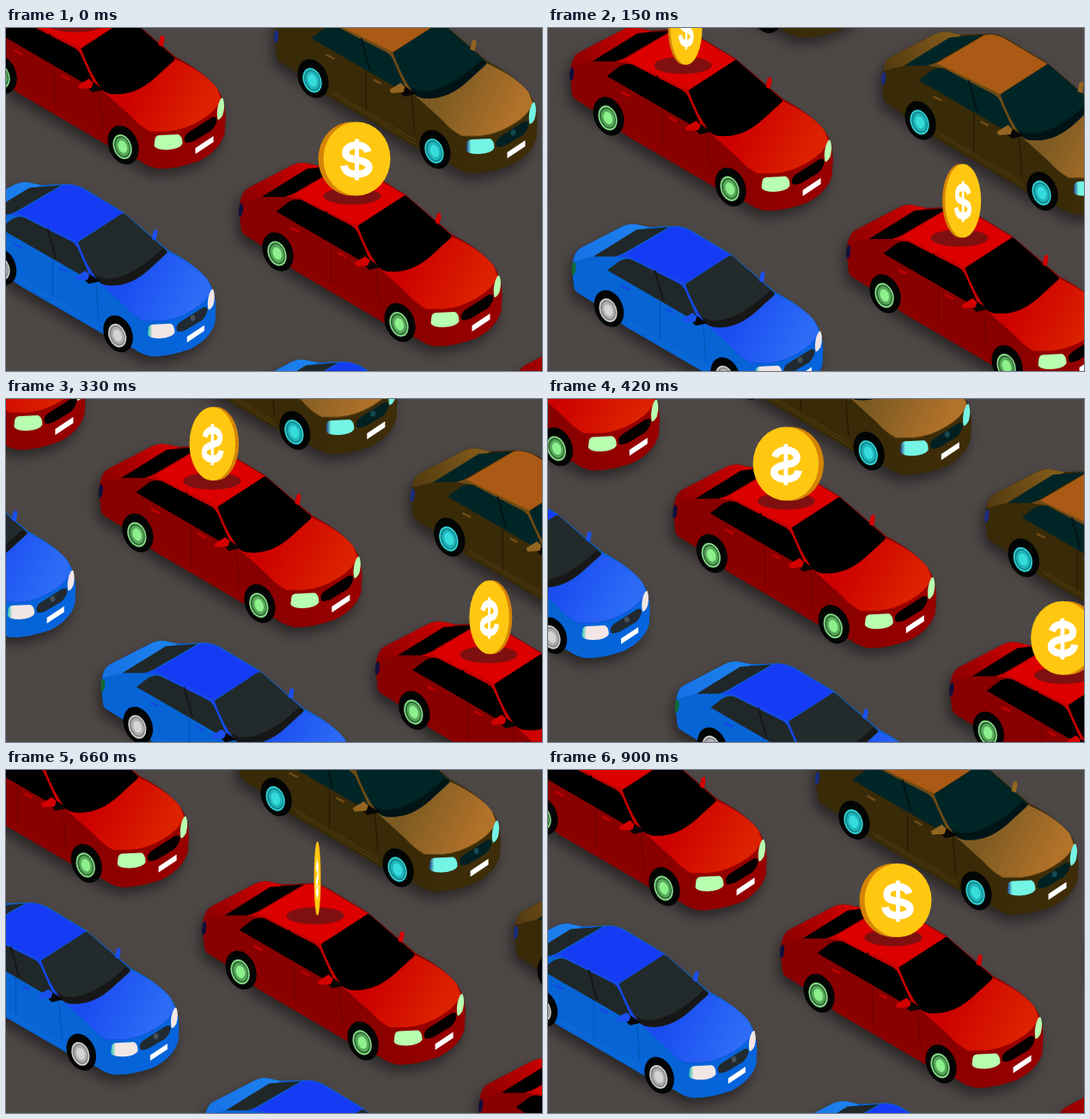
An HTML page with a canvas that plays this animation: 624x400 px, repeating every 1800 ms.

```html
<!DOCTYPE html>
<html>
<head>
<meta charset="utf-8">
<style>
html, body { margin: 0; width: 100%; height: 100%; overflow: hidden; background: #4d4746; }
canvas { display: block; }
</style>
</head>
<body>
<canvas id="stage" width="624" height="400"></canvas>
<script>
const ctx = document.getElementById('stage').getContext('2d');
const STEP = [322, 207];   // distance between neighbours in a lane

const shape = {
  body: 'M274 204Q276 191 283 187L335 160Q343 156 352 158L366 161L395 160Q406 159 418 165L466 194L521 241Q555 259 569 277Q579 292 579 312L578 330Q572 350 548 362Q520 372 500 371Q487 368 480 362L444 345L338 283L300 254L279 241Q275 238 275 230L273 212Z',
  trunk: 'M275 203Q276 191 283 187L335 160Q343 156 352 158L366 161L299 197Z',
  rail: 'M326 197L338 193L411 229L436 280L426 272L409 235L346 200Z',
  rearGlass: 'M299 197L352 164L391 161L343 189Q334 195 325 197Z',
  roof: 'M337 194L393 161Q404 159 416 165L466 195L411 230Z',
  sideGlass: 'M316 214L329 204Q337 198 346 201L403 230Q408 233 411 239L426 273L414 271Z',
  screen: 'M411 231L463 197Q466 194 470 198L518 240Q522 243 518 246L498 264Q487 274 476 279Q462 285 450 284Q440 284 435 278Q422 261 411 231Z',
  screenRim: 'M520 243L498 264Q487 274 476 279Q462 285 450 284Q440 284 435 278L431 271Q442 278 455 275Q482 270 514 239Z',
  hood: 'M426 271L434 278Q442 285 450 284Q462 285 476 279Q487 274 498 264L520 243Q555 259 569 277L574 290Q569 304 550 315Q532 326 512 328L491 328Q478 321 468 309Z',
  lip: 'M468 309Q478 321 491 328L512 328Q532 326 550 315Q569 304 574 290',
  sill: 'M339 275L437 333M341 279L437 337',
  doors: 'M380 252L380 300M433 281L436 325',
  handles: 'M333 233L343 238M388 262L397 267',
  pillar: 'M374 214L384 251',
  lamp: 'M497 336Q498 332 503 332L524 331Q529 333 529 342Q526 348 511 349Q497 349 496 344Z',
  lampSide: 'M571 295Q574 287 576 289Q579 297 576 308Q573 314 570 314Q568 305 571 295Z',
  grille: 'M531 336Q532 331 537 328L562 312Q568 309 569 313Q569 320 562 327L542 339Q534 342 532 340Z',
  plate: 'M544 347L565 333V340L544 354Z',
  mirror: 'M407 274L420 266L425 271L423 277L409 278Z',
  mirrorFoot: 'M420 278L425 270L438 279L424 282Z',
  mirrorFar: 'M501 227L503 217L507 215L508 220L506 229Z'
};
for (const k in shape) shape[k] = new Path2D(shape[k]);
const dollar = new Path2D('M13 -9C11 -15 5 -17 0 -17C-8 -17 -13 -13 -13 -8C-13 -2 -7 -1 0 0C8 2 14 4 14 9C14 14 8 17 0 17C-8 17 -14 14 -15 7');

const red = {
  x: -1.5, y: 0, sx: 1, sy: 1,
  side: '#880000', front: '#980000', trunk: ['#8e0000', '#cc0000'], rail: '#c40000', roof: '#dc0000',
  hood: ['#cc0000', '#dc2200'], lip: '#a40000', glass: '#000', screen: '#000', rim: '#000', line: '#6c0000',
  sill: '#980000', mirror: '#d40000', lamp: '#b8ffb0', lampEdge: '#b8ffb0', grille: '#050000', badge: '#050000',
  tail: '#10103c', wheel: ['#8bdc8b', '#2f6a35', '#58a85a', '#8cf08c']
};
const brown = {
  x: 39.5, y: -202, sx: 1, sy: 1,
  side: '#392a08', front: '#3e2d08', trunk: ['#553c10', '#80591b'], rail: '#6e4b15', roof: '#aa5a14',
  hood: ['#7c5a22', '#b2722a'], lip: '#62440f', glass: '#002527', screen: '#002527', rim: '#001416', line: '#221900',
  sill: '#54400f', mirror: '#946520', lamp: '#74f4e4', lampEdge: '#17307c', grille: '#002022', badge: '#174850',
  tail: '#1b2c80', wheel: ['#32d2d4', '#13888e', '#1fb6ba', '#36dcdc']
};
const blue = {
  x: -49, y: 179.5, sx: .955, sy: .95,
  side: '#0664d4', front: '#0664dc', trunk: ['#1772e4', '#1c80ee'], rail: '#1548e8', roof: '#153cf4',
  hood: ['#1a4cf0', '#2c6cf6'], lip: '#1450e0', glass: '#202728', screen: '#222a2b', rim: '#171717', line: '#0451b0',
  sill: '#1070e0', mirror: '#1a50f0', lamp: '#f2e6e4', lampEdge: '#20bea8', grille: '#202a30', badge: '#48515a',
  tail: '#126a34', wheel: ['#d2d2d2', '#868686', '#aeaeae', '#d4d4d4']
};
blue.x -= 272 * blue.sx;
blue.y -= 157 * blue.sy;

function fill(name, color) {
  ctx.fillStyle = color;
  ctx.fill(shape[name]);
}

function line(name, color, width) {
  ctx.strokeStyle = color;
  ctx.lineWidth = width;
  ctx.stroke(shape[name]);
}

function oval(x, y, rx, ry, color, turn = 0) {
  ctx.fillStyle = color;
  ctx.beginPath();
  ctx.ellipse(x, y, rx, ry, turn, 0, 7);
  ctx.fill();
}

function blend(x0, y0, x1, y1, colors) {
  const g = ctx.createLinearGradient(x0, y0, x1, y1);
  colors.forEach((c, i) => g.addColorStop(i / (colors.length - 1), c));
  return g;
}

function wheel(x, y, [rim, dark, mid, hub]) {
  oval(x + 1, y - 2, 17, 23.5, '#030505', -.4);
  oval(x, y, 10.5, 15, rim, -.35);
  oval(x, y, 9, 13, dark, -.35);
  oval(x + .3, y, 7.5, 11, mid, -.35);
  oval(x + .3, y, 5, 7.5, hub, -.35);
}

function car(c, n) {
  ctx.save();
  ctx.translate(c.x + n * STEP[0], c.y + n * STEP[1]);
  ctx.scale(c.sx, c.sy);
  ctx.save();
  ctx.shadowColor = 'rgba(0,0,0,.45)';
  ctx.shadowBlur = 14;
  ctx.shadowOffsetX = -4;
  ctx.shadowOffsetY = 8;
  fill('body', c.side);
  ctx.restore();
  fill('body', blend(460, 0, 560, 0, [c.side, c.front]));
  line('doors', c.line, 1);
  line('sill', c.sill, 1);
  line('handles', c.rail, 2.5);
  fill('trunk', blend(280, 200, 350, 160, c.trunk));
  fill('rail', c.rail);
  fill('rearGlass', c.glass);
  fill('roof', c.roof);
  fill('sideGlass', c.glass);
  line('pillar', c.rim, 2);
  fill('hood', blend(470, 270, 550, 310, c.hood));
  line('lip', c.lip, 1);
  fill('screen', c.screen);
  fill('screenRim', c.rim);
  oval(275, 212, 2.5, 8, c.tail, .1);
  wheel(317, 263, c.wheel);
  wheel(459, 345.5, c.wheel);
  fill('mirrorFoot', '#080606');
  fill('mirror', c.mirror);
  fill('mirrorFar', c.mirror);
  fill('lamp', blend(496, 0, 502, 0, [c.lampEdge, c.lamp]));
  fill('lampSide', c.lamp);
  fill('grille', c.grille);
  oval(551, 324, 3, 3.6, c.badge);
  fill('plate', '#fff');
  ctx.restore();
}

function coin(n, angle, drop) {
  ctx.save();
  ctx.translate(n * STEP[0], n * STEP[1] + drop);
  oval(403, 196, 33.5, 10, '#801010');
  ctx.translate(405.5, 152.5);
  ctx.scale(Math.cos(angle * Math.PI / 180), 1);
  oval(-3, 0, 39, 43, '#d68406');
  oval(3, 0, 39, 43, '#ffc710');
  ctx.translate(3, 1);
  ctx.strokeStyle = '#fff';
  ctx.lineWidth = 8.5;
  ctx.stroke(dollar);
  ctx.fillStyle = '#fff';
  ctx.fillRect(-2.5, -24, 5, 48);
  ctx.restore();
}

function draw(now) {
  const t = Math.min(Math.floor(now % 1800 / 30) * 30, 900);
  const u = t / 900;
  const p = u * (1.476 - .35 * u - .129 * u ** 4);   // decelerating drive
  ctx.fillStyle = '#4d4746';
  ctx.fillRect(0, 0, 624, 400);
  for (const c of [brown, red, blue])
    for (let k = -2; k < 2; k++) car(c, k + p);
  coin(p - 1, 2 + 358 * u, 6 * (1 - p * p));
  coin(p, 345 * u, 0);
}

const start = performance.now();
function tick() {
  draw(performance.now() - start);
  requestAnimationFrame(tick);
}
tick();
</script>
</body>
</html>
```
